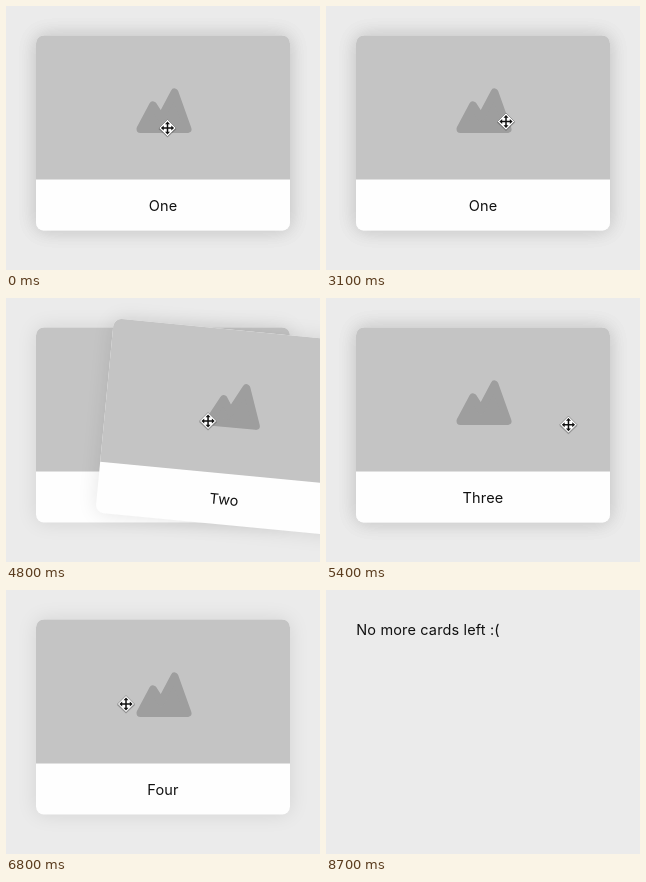
Write an HTML page that moves like this. It is 314x264 px and loops after 9300 ms.

```html
<!DOCTYPE html>
<html lang="en">
<head>
<meta charset="utf-8">
<title>Swipe cards</title>
<style>
  html, body { margin: 0; width: 100%; height: 100%; overflow: hidden; background: #ebebeb; }
  body { position: relative; font: 14.5px/18px Inter, sans-serif; letter-spacing: .01em; color: #111; }
  #note { position: absolute; left: 30px; top: 30px; white-space: nowrap; transform: translate(.3px, .5px); }
  .card {
    position: absolute; left: 30px; top: 30px; width: 254px; height: 195px;
    border-radius: 8px; background: #fefefe; box-shadow: 0 0 20px rgba(0, 0, 0, .1);
  }
  .photo { display: block; width: 254px; height: 144px; border-radius: 8px 8px 0 0; background: #c4c4c4; }
  .label { height: 51px; display: flex; align-items: center; justify-content: center; }
  .cursor { position: absolute; left: 0; top: 0; width: 1px; height: 1px; overflow: visible; }
</style>
</head>
<body>
<div id="note">No more cards left :(</div>
<div id="deck"></div>
<svg id="move" class="cursor">
  <path d="M0-7.5 9 1 0 9.5-9 1Z" fill="#000" opacity=".25"/>
  <path d="M0-8.5 8.5 0 0 8.5-8.5 0Z" fill="#fff" stroke="#777" stroke-width=".7" stroke-linejoin="round"/>
  <path d="M-5 0H5M0-5V5" stroke="#111" stroke-width="1.5"/>
  <path d="M0-6.6 2.5-3.8H-2.5ZM0 6.6 2.5 3.8H-2.5ZM-6.6 0-3.8-2.5V2.5ZM6.6 0 3.8-2.5V2.5Z" fill="#111"/>
</svg>
<svg id="arrow" class="cursor">
  <path d="M.7.8V15L4 12 6.2 17.2 8.5 16.2 6.3 11.2H10.8Z" fill="#111" stroke="#fff" stroke-width="1.2" stroke-linejoin="round"/>
</svg>
<script>
const LOOP = 9300, TICK = 100, GLIDE = 300, EASE = 1.5, EDGE = 314;
const LEFT = -247, RIGHT = 269;

// The hand enters, glides to the grab point, then swipes the card off the stage.
const cards = [
  { name: 'One',   enter: 500,  from: [161.5, 122], grab: [180, 115.5], start: 3200, end: 3900, dx: LEFT,  dy: 24 },
  { name: 'Two',   enter: 4200, from: [-10, 132],   grab: [134, 122],   start: 4600, end: 5100, dx: RIGHT, dy: 10 },
  { name: 'Three', enter: 5300, from: [314, 128],   grab: [157, 125],   start: 5700, end: 6100, dx: LEFT,  dy: 4 },
  { name: 'Four',  enter: 6300, from: [-10, 128],   grab: [120, 114],   start: 6800, end: 7300, dx: RIGHT, dy: 22 }
];
const DONE = 7600, ARROW_IN = 7700, ARROW_OUT = 8400;

const byId = id => document.getElementById(id);
const deck = byId('deck'), move = byId('move'), arrow = byId('arrow');

for (const card of cards) {
  card.el = document.createElement('div');
  card.el.className = 'card';
  card.el.innerHTML = `
    <svg class="photo" viewBox="0 0 254 144">
      <path d="M104.5 93.5 117 70 125 82.5 138.5 57 151.5 93.5Z"
        fill="#9e9e9e" stroke="#9e9e9e" stroke-width="8" stroke-linejoin="round"/>
    </svg>
    <div class="label">${card.name}</div>`;
  deck.prepend(card.el);
}

const progress = (t, start, end) => Math.min(1, Math.max(0, (t - start) / (end - start)));

function glide(t, start, end, from, to) {
  const k = 1 - (1 - progress(t, start, end)) ** EASE;
  return from.map((v, i) => v + (to[i] - v) * k);
}

function place(el, [x, y]) {
  el.style.transform = `translate(${x}px, ${y}px)`;
}

function draw(t) {
  const top = cards.findIndex(card => t <= card.end);
  let hand = cards[0].from;

  cards.forEach((card, i) => {
    const { el, enter, from, grab, start, end, dx, dy } = card;
    const k = progress(t, start, end) ** EASE;
    const x = dx * k, y = dy * k;

    // Only the top card and the one beneath it are mounted.
    el.style.display = top >= 0 && (i === top || i === top + 1) ? '' : 'none';
    el.style.transform = `translate(${x}px, ${y - .5}px) rotate(${x / 12.4}deg)`;

    if (t >= enter) {
      const [hx, hy] = glide(t, enter, enter + GLIDE, from, grab);
      hand = [Math.min(EDGE, hx + x), hy + y * .4];
    }
  });

  move.style.display = t < DONE ? '' : 'none';
  place(move, hand);

  const rest = [124, 203];
  place(arrow, t < ARROW_OUT
    ? glide(t, ARROW_IN, ARROW_IN + 400, [350, 87], rest)
    : glide(t, ARROW_OUT, ARROW_OUT + GLIDE, rest, [160, 275]));
}

const begin = performance.now();
function loop() {
  const t = (performance.now() - begin) % LOOP;
  draw(Math.floor(t / TICK) * TICK);
  requestAnimationFrame(loop);
}
loop();
</script>
</body>
</html>
```
